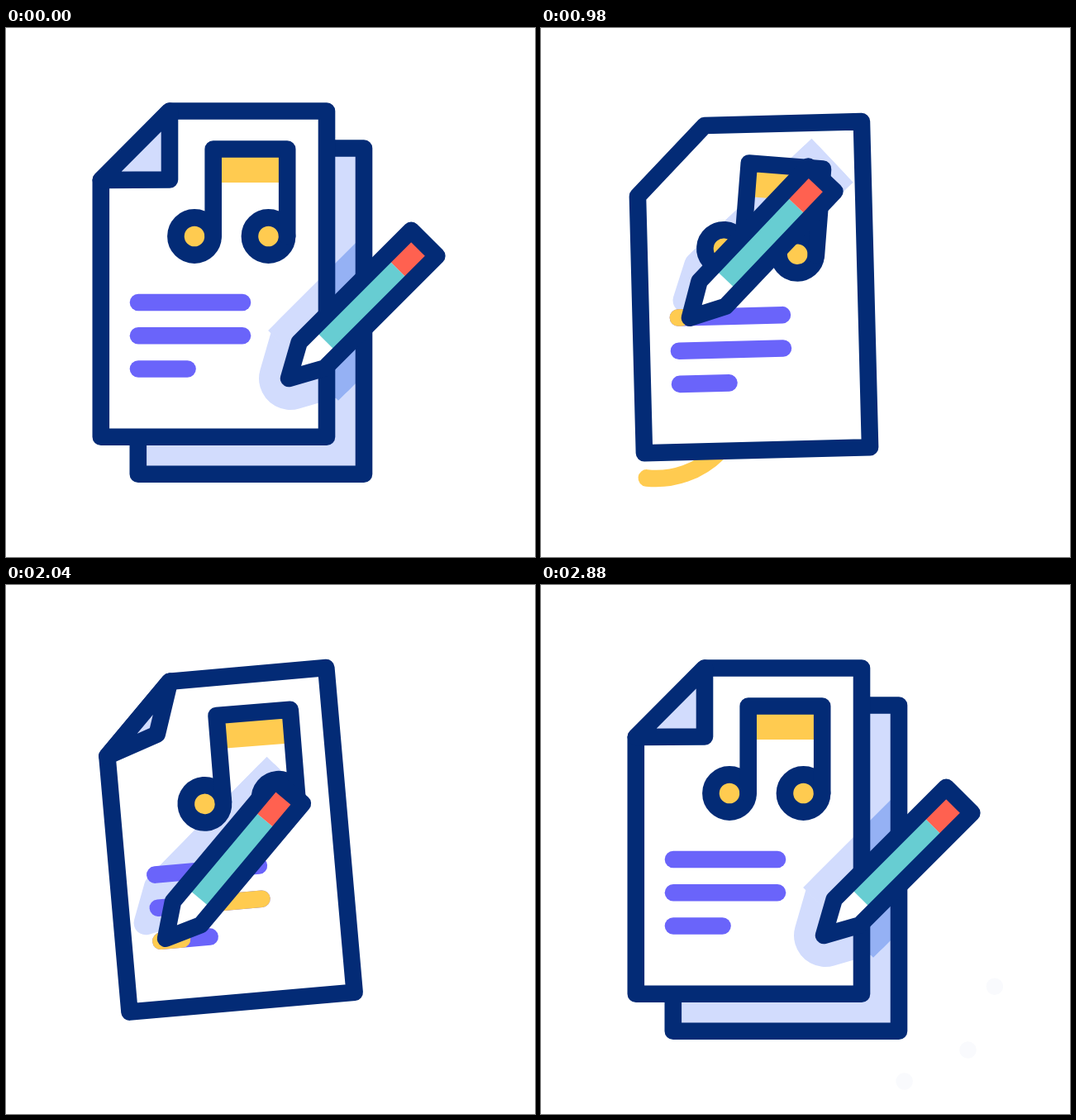
Write an HTML page with a canvas that moves like this. It is 640 px wide and 640 px high and loops after 3.34 s.

```html
<!DOCTYPE html>
<html lang="en">
<head>
<meta charset="utf-8">
<title>Songwriting</title>
<style>
  html, body { margin: 0; width: 100%; height: 100%; overflow: hidden; background: #fff; }
  canvas { display: block; width: 100vmin; height: 100vmin; }
</style>
</head>
<body>
<canvas id="stage" width="640" height="640"></canvas>
<script>
const ctx = document.getElementById('stage').getContext('2d');
const LOOP = 3340, STEP = 20, LINE = 20.6, RAD = Math.PI / 180;
const NAVY = '#032b76', PALE = '#d2dcfd', BLUE = '#95b1f4', PURPLE = '#6a64fa',
      YELLOW = '#ffcb50', TEAL = '#67cdd2', RED = '#ff6150', WHITE = '#fff';
const PIVOT = { x: 260, y: 103 };

// Each row is [time, value, ...]
const TILT = [[220, 0], [767, 5], [1122, -5], [1608, 5], [2040, -5], [2410, 0]];
const BOB = [[220, 0], [500, -39], [945, 17], [1368, -38.5], [1823, 17], [2350, 0]];
const SWAY = [[220, 0], [580, -4], [1000, 6], [1440, -4.3], [1750, 5], [2100, 0]];
const TIP = [[220, 342, 424], [660, 236, 329], [910, 166, 332], [980, 174, 332.5], [1250, 268, 333],
  [1380, 232, 350], [1490, 164, 372], [1790, 268, 373], [2010, 162, 408], [2040, 166, 410],
  [2160, 205, 413], [2520, 326, 421], [2660, 342, 424]];
const LAG = [[220, 2, 0, 0], [660, 16, 24, -2.5], [980, -6, -21, 3], [1380, 6, 37, -2],
  [1520, -14, -20, 3], [1880, 10, 28, -2], [2040, -24, -19, 4.5], [2520, 8, -7, 0], [2660, 2, 0, 0]];
const SPREAD = [[220, 38], [500, 14.5], [2180, 14.5], [2500, 38]];
const FOLD = [[220, 1], [440, 0], [1940, 0], [2140, 1]];
const SLIDE = [[220, 45], [500, 0], [2050, 0], [2530, 45]];
const ARC_HEAD = [[590, 0], [660, 49], [740, 95], [860, 135]];
const ARC_TAIL = [[770, 0], [980, 84], [1025, 135]];
const RAY_HEAD = [[2360, 20], [2520, 87], [2800, 121]];
const RAY_TAIL = [[2380, 20], [2520, 72], [2880, 121]];

const PAGE = [[198, 100.5], [388, 100.5], [388, 494.7], [114.8, 494.7], [114.8, 184]];
const PENCIL = [[0, 0], [40, -22], [231.6, -22], [231.6, 22], [40, 22]];
const RULES = [
  { y: 332, end: 286, from: 950, span: 290 },
  { y: 372.3, end: 286, from: 1480, span: 290 },
  { y: 412.5, end: 219.5, from: 1990, span: 110 }
];

// Monotone cubic through the keys, at rest on both ends
function track(keys, t, col = 1) {
  const last = keys.length - 1;
  if (t <= keys[0][0]) return keys[0][col];
  if (t >= keys[last][0]) return keys[last][col];
  let i = 0;
  while (t >= keys[i + 1][0]) i++;
  const rate = n => (keys[n + 1][col] - keys[n][col]) / (keys[n + 1][0] - keys[n][0]);
  const slope = n => {
    if (n === 0 || n === last) return 0;
    const a = rate(n - 1), b = rate(n);
    return a * b <= 0 ? 0 : 2 * a * b / (a + b);
  };
  const h = keys[i + 1][0] - keys[i][0], u = (t - keys[i][0]) / h;
  const e = u * u * (3 - 2 * u);
  return keys[i][col] * (1 - e) + keys[i + 1][col] * e
    + h * u * (1 - u) * ((1 - u) * slope(i) - u * slope(i + 1));
}

const ramp = (t, from, span) => track([[from, 0], [from + span, 1]], t);

function trace(points, close = true) {
  ctx.beginPath();
  for (const [x, y] of points) ctx.lineTo(x, y);
  if (close) ctx.closePath();
}

function fill(color) {
  ctx.fillStyle = color;
  ctx.fill();
}

function stroke(color, width = LINE, join = 'round') {
  ctx.strokeStyle = color;
  ctx.lineWidth = width;
  ctx.lineJoin = join;
  ctx.lineCap = 'round';
  ctx.stroke();
}

function bar(x0, y0, x1, y1, color) {
  trace([[x0, y0], [x1, y1]], false);
  stroke(color);
}

function box(x, y, w, h, color) {
  ctx.fillStyle = color;
  ctx.fillRect(x, y, w, h);
}

function layer(draw) {
  ctx.save();
  draw();
  ctx.restore();
}

function swoosh(t, mirrored) {
  const a = track(ARC_TAIL, t), b = track(ARC_HEAD, t);
  if (b - a < 0.5) return;
  layer(() => {
    if (mirrored) {
      ctx.translate(503, 2);
      ctx.scale(-1, 1);
    }
    ctx.beginPath();
    ctx.arc(139, 438, 107, (180 - a) * RAD, (180 - b) * RAD, true);
    stroke(YELLOW);
  });
}

function rays(t) {
  if (t < 2380) return;
  const a = track(RAY_TAIL, t), b = Math.max(track(RAY_HEAD, t), a + 0.01);
  const k = ramp(t, 2660, 220);
  const mix = (from, to) => Math.round(from + (to - from) * k);
  const color = `rgb(${mix(255, 249)},${mix(203, 250)},${mix(80, 253)})`;
  for (const deg of [2.7, 43, 84.5]) {
    const c = Math.cos(deg * RAD), s = Math.sin(deg * RAD);
    bar(428 + a * c, 480 + a * s, 428 + b * c, 480 + b * s, color);
  }
}

function pagePose(p) {
  ctx.translate(PIVOT.x, PIVOT.y + p.bob);
  ctx.rotate(p.tilt);
  ctx.translate(-PIVOT.x, -PIVOT.y);
}

function pencilPose(x, y, turn) {
  ctx.translate(x, y);
  ctx.rotate(turn - 45 * RAD);
}

function shadow(p, color) {
  ctx.setTransform(1, 0, 0, 1, 0, 0);
  pencilPose(p.x + p.lagX, p.y + p.lagY, p.tilt + p.lagTurn);
  trace(PENCIL);
  fill(color);
  stroke(color, p.spread * 2);
  trace([[60, -22], [231.6, -22], [231.6, 22], [60, 22]]);
  stroke(color, p.spread * 2, 'miter');
}

function sheet(p, shift, paper, shade) {
  layer(() => {
    pagePose(p);
    ctx.translate(shift, shift);
    trace(PAGE);
    fill(paper);
    layer(() => {
      ctx.clip();
      shadow(p, shade);
    });
    trace(PAGE);
    stroke(NAVY);
  });
}

function fold(k) {
  if (k < 0.01) return;
  trace([[198, 100.5], [156.5 + 41.5 * k, 142 + 41.5 * k], [114.8, 184]]);
  fill(PALE);
  stroke(NAVY);
}

function rules(t) {
  for (const r of RULES) {
    const len = r.end - 160;
    bar(160, r.y, r.end, r.y, PURPLE);
    const head = ramp(t, r.from, r.span);
    const tail = ramp(t, r.from + Math.min(450, r.span + 160), 250);
    if (head > 0 && tail < 1) bar(160 + len * tail, r.y, 160 + len * head, r.y, YELLOW);
  }
}

function note(turn) {
  layer(() => {
    ctx.translate(243, 146.5);
    ctx.rotate(turn);
    ctx.translate(-243, -146.5);
    box(256, 150, 80, 37, YELLOW);
    for (const x of [228, 317.5]) {
      ctx.beginPath();
      ctx.arc(x, 252, 22.6, 0, 2 * Math.PI);
      fill(YELLOW);
      stroke(NAVY);
    }
    trace([[250.7, 252], [250.7, 146.5], [340.2, 146.5], [340.2, 252]], false);
    stroke(NAVY);
  });
}

function pencil(p) {
  layer(() => {
    pencilPose(p.x, p.y, p.tilt);
    trace(PENCIL);
    fill(WHITE);
    box(63.6, -20, 123.4, 40, TEAL);
    box(187, -20, 42, 40, RED);
    trace(PENCIL);
    stroke(NAVY);
  });
}

function poseAt(t) {
  const tilt = track(TILT, t) * RAD, bob = track(BOB, t);
  const dx = track(TIP, t, 1) - PIVOT.x, dy = track(TIP, t, 2) - PIVOT.y;
  const c = Math.cos(tilt), s = Math.sin(tilt);
  return {
    tilt, bob,
    x: PIVOT.x + dx * c - dy * s,
    y: PIVOT.y + bob + dx * s + dy * c,
    lagX: track(LAG, t, 1),
    lagY: track(LAG, t, 2),
    lagTurn: track(LAG, t, 3) * RAD,
    spread: track(SPREAD, t)
  };
}

function draw(t) {
  const p = poseAt(t);
  ctx.setTransform(1, 0, 0, 1, 0, 0);
  box(0, 0, 640, 640, WHITE);
  swoosh(t, false);
  swoosh(t - 1010, true);
  rays(t);
  const slide = track(SLIDE, t);
  if (slide > 0.1) sheet(p, slide, PALE, BLUE);
  sheet(p, 0, WHITE, PALE);
  layer(() => {
    pagePose(p);
    fold(track(FOLD, t));
    rules(t);
    note(track(SWAY, t) * RAD);
  });
  pencil(p);
}

const start = performance.now();
function tick() {
  const t = (performance.now() - start) % LOOP;
  draw(Math.floor(t / STEP) * STEP);
  requestAnimationFrame(tick);
}
tick();
</script>
</body>
</html>
```
